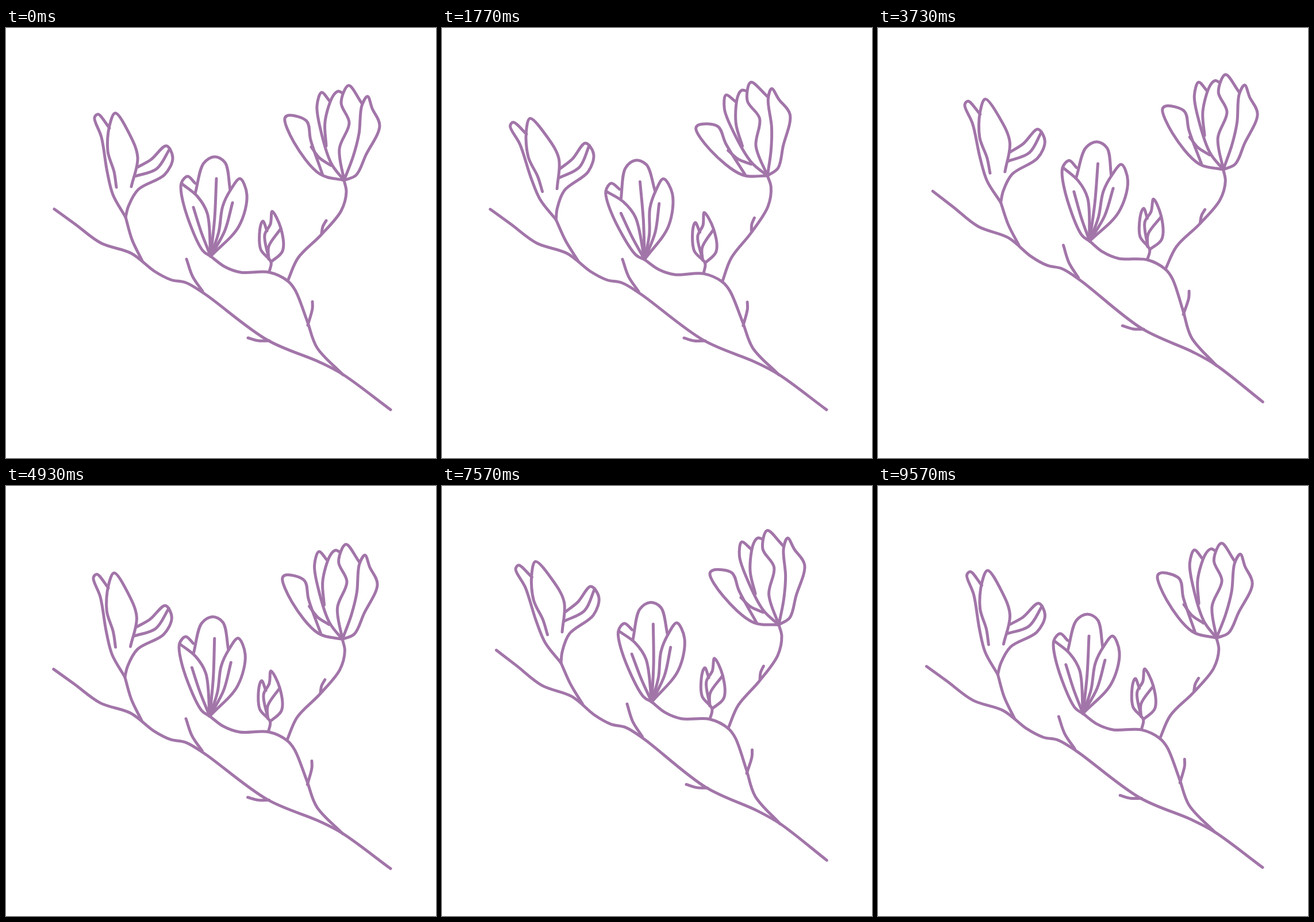
An HTML page with a canvas that plays this animation: 748x748 px, repeating every 9.61 s.

```html
<!DOCTYPE html>
<html lang="en">
<head>
<meta charset="utf-8">
<title>Swaying magnolia branch</title>
<style>
html, body { margin: 0; width: 100%; height: 100%; overflow: hidden; background: #fff; }
canvas { display: block; }
</style>
</head>
<body>
<canvas id="stage" width="748" height="748"></canvas>
<script>
const ctx = document.getElementById('stage').getContext('2d');
const LOOP = 9610;
const SWAY = LOOP / 2000; // seconds per sway, two per loop

// swing in degrees, lag in seconds; bend is the share of the swing taken by the stem
const root = { pivot: [1120, 670], swing: 1.4, lag: 0.89 };
const fork = { pivot: [577, 597], base: [490, 440], swing: 1.05, lag: 1.25, bend: 1 };
const middle = { pivot: [490, 440], base: [356, 397], swing: 3.65, lag: 2, bend: 0.13 };
const right = { pivot: [490, 440], base: [588, 265], swing: 6.7, lag: 2.25, bend: 0.44 };
const left = { pivot: [235, 403], base: [208, 329], swing: 5.3, lag: 2.43, bend: 0.87 };
const bud = { pivot: [458, 424], base: [458, 424], swing: 0.85, lag: 1.7, bend: 0 };
const joints = [root, fork, middle, right, left, bud];

function rotate([x, y], [px, py], angle) {
  const c = Math.cos(angle), s = Math.sin(angle);
  return [px + (x - px) * c - (y - py) * s, py + (x - px) * s + (y - py) * c];
}

// A stem yields mostly near its pivot and stays stiff towards its base of the flower.
function bendStem(point, { pivot, base, bend, angle }) {
  const ax = base[0] - pivot[0], ay = base[1] - pivot[1];
  const along = ((point[0] - pivot[0]) * ax + (point[1] - pivot[1]) * ay) / (ax * ax + ay * ay);
  const rest = 1 - Math.min(1, Math.max(0, along));
  return rotate(point, pivot, angle * bend * (1 - rest ** 3));
}

function turnHead(point, { pivot, base, bend, angle }) {
  const [x, y] = rotate(point, base, angle);
  const moved = rotate(base, pivot, angle * bend);
  return [x + moved[0] - base[0], y + moved[1] - base[1]];
}

const sway = p => rotate(p, root.pivot, root.angle);
const upper = p => sway(bendStem(p, fork));

const path = text => text.split(' ').map(p => p.split(',').map(Number));

// Shallow arc from a to b, pushed sideways by belly
function bow(a, b, belly) {
  const dx = b[0] - a[0], dy = b[1] - a[1], k = belly / Math.hypot(dx, dy);
  return [a, [a[0] + dx / 2 - dy * k, a[1] + dy / 2 + dx * k], b];
}

const parts = [
  { move: sway, strokes: [
    path('84,315 120,341 165,374 218,392 258,423 287,438 313,443 345,462 455,543 545,581 585,602 669,664'),
    bow([314, 402], [342, 458], 4),
    bow([421, 539], [458, 544], 2.5),
  ] },
  { move: p => upper(bendStem(p, middle)), strokes: [
    path('586,603 541,556 524,510 503,456 490,440 458,425 408,425 380,415 356,397'),
    path('533,476 533,488 525,517'),
  ] },
  { move: p => upper(bendStem(p, right)), strokes: [
    path('490,440 508,400 548,360 583,318 592,285 588,265'),
    bow([557, 335], [549, 357], 2),
  ] },
  { move: p => sway(bendStem(p, left)), strokes: [
    bow([237, 405], left.base, -3.5),
  ] },
  { move: p => sway(turnHead(p, left)), strokes: [
    path('208,329 186,290 176,250 166,190 154,156 160,150 180,174'),
    path('192,277 188,250 177,214 180,170 190,148 214,183 229,225 218,276'),
    path('208,329 213,310 230,281 276,255 290,226 279,205 252,229 229,242'),
    path('224,258 262,245 285,210'),
  ] },
  { move: p => upper(turnHead(p, middle)), strokes: [
    path('329,288 344,235 363,224 381,234 390,282'),
    path('356,397 342,387 309,307 305,270 316,258 329,270'),
    path('306,271 333,293 350,322 356,397'),
    path('356,397 405,345 419,290 407,262 391,281 377,310 370,355 356,397'),
    bow([326, 312], middle.base, 1.5),
    bow([366, 262], middle.base, -2),
    bow([394, 304], middle.base, -6),
  ] },
  { move: p => upper(turnHead(p, bud)), strokes: [
    path('458,424 461,407 443,385 443,343 447,336 454,353'),
    path('461,407 481,388 478,348 463,319 460,341 450,360 457,401'),
    path('478,349 457,380 457,402'),
  ] },
  { move: p => upper(turnHead(p, right)), strokes: [
    path('588,265 546,254 501,199 485,157 491,152 523,162 530,195 551,256'),
    bow([531, 207], [565, 239], 4),
    path('588,265 566,236 547,176 541,135 549,112 563,127'),
    path('557,205 555,163 569,118 578,110 585,113'),
    path('588,265 580,210 597,165 583,130 596,100 619,131'),
    path('588,265 604,223 614,184 619,135 629,119 637,140 650,170 626,221 609,256 588,265'),
  ] },
];

// Centripetal Catmull-Rom curve through the points
function strokeCurve(pts) {
  const pace = pts.slice(1).map((p, i) => Math.sqrt(Math.hypot(p[0] - pts[i][0], p[1] - pts[i][1])));
  const speed = (i, axis) => (pts[i + 1][axis] - pts[i][axis]) / pace[i];
  const last = pts.length - 1;
  const slope = (i, axis) => {
    if (i === 0) return speed(0, axis);
    if (i === last) return speed(last - 1, axis);
    const u = pace[i - 1], v = pace[i];
    return (speed(i - 1, axis) * v + speed(i, axis) * u) / (u + v);
  };
  ctx.beginPath();
  ctx.moveTo(...pts[0]);
  for (let i = 0; i < last; i++) {
    const k = pace[i] / 3, [ax, ay] = pts[i], [bx, by] = pts[i + 1];
    ctx.bezierCurveTo(
      ax + slope(i, 0) * k, ay + slope(i, 1) * k,
      bx - slope(i + 1, 0) * k, by - slope(i + 1, 1) * k,
      bx, by);
  }
  ctx.stroke();
}

function draw(now) {
  const phase = (now % LOOP) / 1000;
  const wave = s => Math.cos(2 * Math.PI * s / SWAY);
  for (const j of joints) {
    j.angle = j.swing * (wave(j.lag) - wave(phase - j.lag)) * Math.PI / 180;
  }
  ctx.fillStyle = '#fff';
  ctx.fillRect(0, 0, 748, 748);
  ctx.strokeStyle = '#a275a9';
  ctx.lineWidth = 5;
  ctx.lineCap = ctx.lineJoin = 'round';
  for (const { move, strokes } of parts) {
    for (const pts of strokes) strokeCurve(pts.map(move));
  }
}

let start;
function tick(now) {
  start ??= now;
  draw(now - start);
  requestAnimationFrame(tick);
}
draw(0);
requestAnimationFrame(tick);
</script>
</body>
</html>
```
